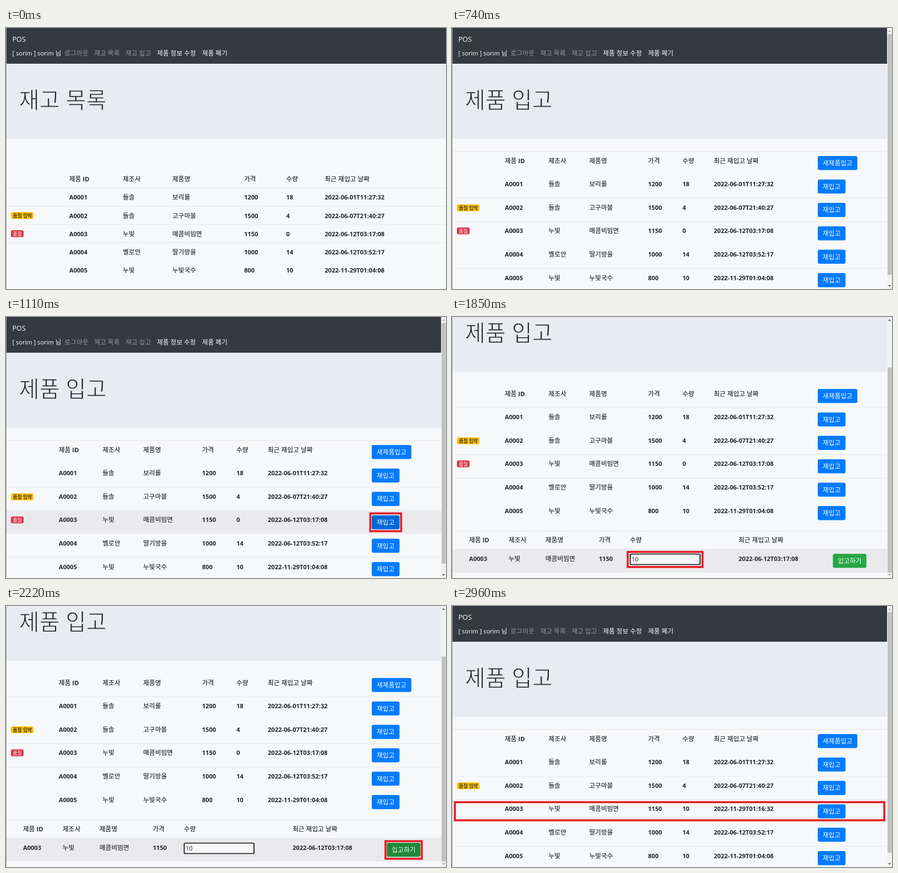
These frames come from a looping animation (800x475 px, 3.33 s). An HTML page:

```html
<!DOCTYPE html>
<html lang="ko">
<head>
<meta charset="utf-8">
<title>POS</title>
<style>
  html, body { margin: 0; width: 100%; height: 100%; overflow: hidden; background: #f6f8f9; }
  svg { display: block; width: 800px; height: 475px; }
  text { font: 700 11.1px "Open Sans", "Noto Sans CJK KR", "Noto Sans CJK", sans-serif; fill: #212529; white-space: pre; }
  .ko { font-family: "Noto Sans CJK KR", "Noto Sans CJK", sans-serif; font-size: 11.5px; font-weight: 500; letter-spacing: .25px; stroke: #212529; stroke-width: .2px; }
  .plain, .plain .ko { font-weight: 400; stroke: none; }
  .brand { font-size: 12.6px; font-weight: 400; }
  /* A stroke in the banner colour thins the heavy strokes of the title. */
  .title .ko { font-size: 40.4px; font-weight: 300; letter-spacing: .15px; stroke: #e8ebef; stroke-width: 1.1px; }
  .title { font-size: 40px; font-weight: 300; }
  .badge, .badge .ko { font-size: 8.8px; letter-spacing: 0; }
  .white { fill: #fff; }
  .white .ko { stroke: none; }
  .muted { fill: #999c9f; }
  .hover { fill: #cdced0; }
</style>
</head>
<body>
<svg id="stage" viewBox="0 0 800 475"></svg>
<script>
const STEP = 370;
const PAGE = '#f6f8f9', BANNER = '#e8ebef', LINE = '#e7eaed', HOVER_ROW = '#eaeaec', RED = '#e71c24';
const HEAD = ['제품 ID', '제조사', '제품명', '가격', '수량', '최근 재입고 날짜'];
const ITEMS = [
  ['A0001', '들솔', '보리롤', '1200', '18', '2022-06-01T11:27:32'],
  ['A0002', '들솔', '고구마볼', '1500', '4', '2022-06-07T21:40:27'],
  ['A0003', '누빛', '매콤비빔면', '1150', '0', '2022-06-12T03:17:08'],
  ['A0004', '벨로안', '딸기방울', '1000', '14', '2022-06-12T03:52:17'],
  ['A0005', '누빛', '누빛국수', '800', '10', '2022-11-29T01:04:08']
];
const RESTOCKED = ITEMS.map((row, i) => i === 2 ? [...row.slice(0, 4), '10', '2022-11-29T01:16:32'] : row);
const LIST_COLS = [115, 212.5, 302.5, 433, 509.5, 579.5];
const STOCK_COLS = [96, 175.5, 249.5, 356.5, 419, 476];
const FORM_COLS = [31, 103, 170, 267, 323.5, 521];
const SCROLL = 102;

// Hangul and Latin runs have their own size and spacing.
function text(x, y, str, cls = '') {
  const runs = str.match(/[가-힣]+|[^가-힣]+/g)
    .map(s => /[가-힣]/.test(s) ? `<tspan class="ko">${s}</tspan>` : s).join('');
  return `<text x="${x}" y="${y}" class="${cls}">${runs}</text>`;
}
const rect = (x, y, w, h, fill, r = 0) =>
  `<rect x="${x}" y="${y}" width="${w}" height="${h}" rx="${r}" fill="${fill}"/>`;
const frame = (x, y, w, h, color = RED, line = 3.6, fill = 'none', r = 0) =>
  `<rect x="${x}" y="${y}" width="${w}" height="${h}" rx="${r}" fill="${fill}" stroke="${color}" stroke-width="${line}"/>`;
const rule = (y, w, color = LINE) => rect(1, y, w, 1, color);
const cells = (cols, row, mid) =>
  row.map((s, i) => text(cols[i], Math.round(mid + 4.4), s)).join('');
const button = (x, y, w, label, fill) =>
  rect(x, y, w, 25.6, fill, 3) + text(x + 9, Math.round(y + 17), label, 'plain white');

function badge(qty, mid) {
  if (qty > 4) return '';
  const out = qty === 0, top = Math.round(mid - 5.8);
  return rect(9, top, out ? 23 : 41, 12.5, out ? '#dc3545' : '#ffc107', 3) +
    text(12.5, top + 9.7, out ? '품절' : '품절 임박', out ? 'badge white' : 'badge');
}

function header(title, w, hover) {
  return rect(0, 0, w, 65, '#343a40') +
    text(11.5, 24.5, 'POS', 'brand white') +
    text(11.5, 49.5, '[ sorim ] sorim 님', 'plain white') +
    text(106.5, 50, '로그아웃', 'plain muted') +
    text(160.5, 50, '재고 목록', 'plain muted') +
    text(217.5, 50, '재고 입고', hover ? 'plain hover' : 'plain muted') +
    text(274.5, 50, '제품 정보 수정', 'plain white') +
    text(356.5, 50, '제품 폐기', 'plain white') +
    rect(1, 65, w - 1, 136.6, BANNER, 4) +
    text(23.5, 146, title, 'title');
}

function scrollbar(top, height, scrolled) {
  const dark = '#505050', light = '#a3a3a3';
  return rect(791, 0, 9, 475, '#f1f1f1') + rect(792, top, 7.5, height, '#c1c1c1') +
    `<path d="M793 7l2.5-3 2.5 3z" fill="${scrolled ? dark : light}"/>` +
    `<path d="M793 468l2.5 3 2.5-3z" fill="${scrolled ? light : dark}"/>`;
}

const edge = rect(0, 0, 1, 475, '#a2a4a6');

function listPage(hover) {
  let s = header('재고 목록', 800, hover) + cells(LIST_COLS, HEAD, 275);
  ITEMS.forEach((row, i) => {
    const mid = 308 + 33.1 * i;
    if (i < 4) s += rule(Math.round(mid - 17), 799);
    s += badge(+row[4], mid) + cells(LIST_COLS, row, mid);
  });
  if (hover) s += frame(213, 35.5, 55, 21);
  return s + edge;
}

function stockTable(items, hoverRow, lines) {
  let s = header('제품 입고', 791) + cells(STOCK_COLS, HEAD, 241.3) +
    button(665, 233, 72, '새제품입고', '#007bff');
  items.forEach((row, i) => {
    const mid = 283.7 + 42.6 * i, over = i === hoverRow;
    if (over) s += rect(1, mid - 17, 790, 42.6, HOVER_ROW);
    if (lines.includes(i)) s += rule(Math.round(mid - 17), 790);
    s += badge(+row[4], mid) + cells(STOCK_COLS, row, mid) +
      button(665, mid - 8, 50.5, '재입고', over ? '#0069d9' : '#007bff');
  });
  return s;
}

function stockPage(items, hoverRow, mark = '') {
  return stockTable(items, hoverRow, [1, 2, 4]) + rule(224, 790, '#efe6e8') +
    mark + scrollbar(11, 438, false) + edge;
}

function formPage(qty, active, mark = '') {
  const item = ITEMS[2].slice();
  item[4] = ' ';
  let s = `<g transform="translate(0 ${-SCROLL})">${stockTable(ITEMS, -1, [0, 2, 3])}</g>`;
  if (qty) s += rect(1, 422, 790, 42, HOVER_ROW);
  s += [389, 422, 464].map(y => rule(y, 790)).join('') +
    cells(FORM_COLS, HEAD, 406) + cells(FORM_COLS, item, 439.5) +
    (qty ? frame(324, 431.5, 127, 19, '#101010', 1.7, PAGE, 2)
         : frame(323.5, 431.5, 128, 19, '#999', 1, PAGE, 1)) +
    (qty ? text(326.5, 445, qty, 'plain') : '') +
    button(692.5, 431, 61, '입고하기', active ? '#218838' : '#28a745');
  return s + mark + scrollbar(92, 373, true) + edge;
}

const scenes = [
  listPage(false),
  listPage(true),
  stockPage(ITEMS, -1),
  stockPage(ITEMS, 2, frame(662.4, 357.4, 56, 32.4)),
  formPage('', false),
  formPage('10', false, frame(319.5, 427.5, 136, 27.5)),
  formPage('10', true, frame(690, 428, 66, 32)),
  stockPage(RESTOCKED, -1),
  stockPage(RESTOCKED, -1, frame(5.2, 357, 780.8, 33))
];

const stage = document.getElementById('stage');
stage.innerHTML = scenes.map(s => `<g visibility="hidden">${s}</g>`).join('');
const layers = [...stage.children];
let shown = -1;

function draw() {
  const next = Math.floor(performance.now() / STEP) % layers.length;
  if (next !== shown) {
    layers.forEach((g, i) => g.setAttribute('visibility', i === next ? 'visible' : 'hidden'));
    shown = next;
  }
  requestAnimationFrame(draw);
}
draw();
</script>
</body>
</html>
```
